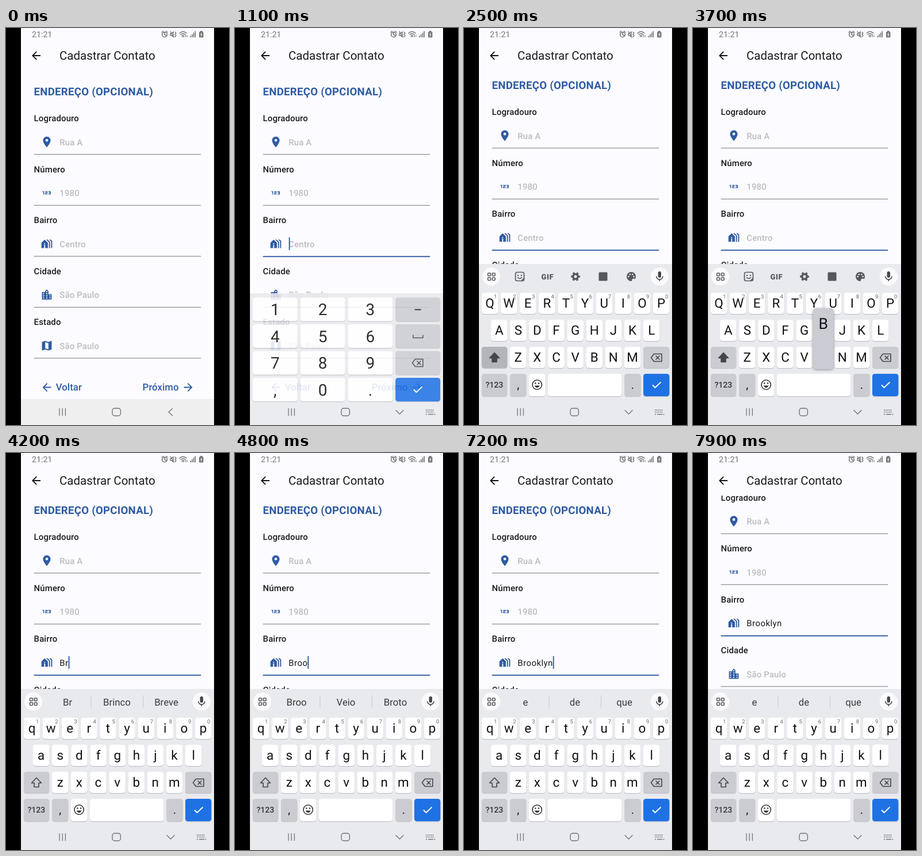
These frames come from a looping animation (388 px wide and 690 px high, 8000 ms). An HTML page:

```html
<!DOCTYPE html>
<html lang="pt">
<head>
<meta charset="utf-8">
<title>Cadastrar Contato</title>
<style>
html, body { margin: 0; width: 100%; height: 100%; overflow: hidden; background: #000; }
svg { display: block; width: 100%; height: 100%; font-family: Roboto, sans-serif; text-rendering: geometricPrecision; }
.line { fill: none; stroke-linecap: round; stroke-linejoin: round; }
.mid { text-anchor: middle; }
.label { font-size: 14.93px; font-weight: 500; letter-spacing: .14px; fill: #1b1b1f; }
.hint { font-size: 14.93px; font-weight: 500; letter-spacing: .14px; fill: #bcbbc0; }
.typed { font-size: 14.93px; letter-spacing: .467px; fill: #1b1b1f; }
.action { font-size: 16.8px; font-weight: 500; letter-spacing: .05px; fill: #2f5ba3; }
.popup { filter: drop-shadow(0 1.5px 2px #0006); }
</style>
</head>
<body>
<svg id="stage" viewBox="0 0 388 690" preserveAspectRatio="none"></svg>
<script>
const BLUE = '#2f5ba3', INK = '#1b1b1f', GREY = '#747478', PANEL = '#e9eaee', FUNC = '#cbccd2', ACCENT = '#1f72e4', TOOL = '#55585d';

const rect = (x, y, w, h, fill, rx = 0, extra = '') =>
  `<rect x="${x}" y="${y}" width="${w}" height="${h}" rx="${rx}" fill="${fill}" ${extra}/>`;
const disc = (x, y, r, fill) => `<circle cx="${x}" cy="${y}" r="${r}" fill="${fill}"/>`;
const text = (s, x, y, cls, extra = '') => `<text x="${x}" y="${y}" class="${cls}" ${extra}>${s}</text>`;
const glyph = (s, x, y, size, fill = '#111', extra = '') => text(s, x, y, 'mid', `font-size="${size}" fill="${fill}" ${extra}`);
const line = (d, color, width = 1.4, extra = '') =>
  `<path class="line" d="${d}" stroke="${color}" stroke-width="${width}" ${extra}/>`;
const icon = (d, x, y, fill, size = 22.4) =>
  `<path d="${d}" fill="${fill}" fill-rule="evenodd" transform="translate(${x - size / 2} ${y - size / 2}) scale(${size / 24})"/>`;
const group = (id, body, extra = '') => `<g id="${id}" ${extra}>${body}</g>`;
const key = (x, y, w, h, fill = '#fff') => rect(x, y + 1.2, w, h, '#c0c2c8', 4.5) + rect(x, y, w, h, fill, 4.5);

const ICONS = {
  back: 'M20 11H7.83l5.59-5.59L12 4l-8 8 8 8 1.41-1.41L7.83 13H20z',
  next: 'M12 4l-1.41 1.41L16.17 11H4v2h12.17l-5.58 5.59L12 20l8-8z',
  pin: 'M12 2C8.13 2 5 5.13 5 9c0 5.25 7 13 7 13s7-7.75 7-13c0-3.87-3.13-7-7-7zm0 9.5a2.5 2.5 0 010-5 2.5 2.5 0 010 5z',
  digits: 'M7 15H5.5v-4.5H4V9h3zm6.5-1.5h-3v-1h2c.55 0 1-.45 1-1V10c0-.55-.45-1-1-1H9v1.5h3v1h-2c-.55 0-1 .45-1 1V15h4.5zm6 .5v-4c0-.55-.45-1-1-1H15v1.5h3v1h-2v1h2v1h-3V15h3.5c.55 0 1-.45 1-1z',
  houses: 'M8 4l-6 6v10h5v-6h2v6h5V10zM9 13H7v-2h2zM18 20V8.35L13.65 4h-2.83L16 9.18V20zM22 20V6.69L19.31 4h-2.83L20 7.52V20z',
  city: 'M15 11V5l-3-3-3 3v2H3v14h18V11zM7 19H5v-2h2zm0-4H5v-2h2zm0-4H5V9h2zm6 8h-2v-2h2zm0-4h-2v-2h2zm0-4h-2V9h2zm0-4h-2V5h2zm6 12h-2v-2h2zm0-4h-2v-2h2z',
  map: 'M20.5 3l-.16.03L15 5.1 9 3 3.36 4.9c-.21.07-.36.25-.36.48V20.5c0 .28.22.5.5.5l.16-.03L9 18.9l6 2.1 5.64-1.9c.21-.07.36-.25.36-.48V3.5c0-.28-.22-.5-.5-.5zM15 19l-6-2.11V5l6 2.11z'
};

const FIELDS = [
  ['Logradouro', 'Rua A', 'pin'], ['Número', '1980', 'digits'], ['Bairro', 'Centro', 'houses'],
  ['Cidade', 'São Paulo', 'city'], ['Estado', 'São Paulo', 'map']
];
const PITCH = 88.55, TEXT_X = 93.3;

function form() {
  const rows = FIELDS.map(([label, hint, name], i) => {
    const y = i * PITCH;
    return text(label, 48.6, 162 + y, 'label') + icon(ICONS[name], 71, 198 + y, BLUE) +
      text(hint, TEXT_X, 203.8 + y, 'hint', `id="hint${i}"`) + rect(48.6, 219.2 + y, 290.6, 1, '#77767c', 0, `id="rule${i}"`);
  }).join('');
  return text('ENDEREÇO (OPCIONAL)', 48.6, 116.7, '', `font-size="18.67" font-weight="700" letter-spacing=".233" fill="${BLUE}"`) +
    rows + text('', TEXT_X, 380.9, 'typed', 'id="typed"') + rect(TEXT_X, 364, 1.87, 22, BLUE, 0, 'id="cursor"');
}

function statusBar() {
  return text('21:21', 45, 16, '', `font-size="14.2" fill="${GREY}"`) +
    line('M276 7.5V11.5L278.5 13M271 7.5L273.5 5.5M281 7.5L278.5 5.5', GREY, 1.5) +
    `<circle cx="276" cy="11.5" r="4.3" fill="none" stroke="${GREY}" stroke-width="1.6"/>` +
    line('M286 9.5H288L291 6.5V15.5L288 13H286ZM286 6L292 16M294 7L296 9L294 11L296 13L294 15.5', GREY, 1.4) +
    line('M302 9Q308 3.5 314 9M304 11.5Q308 8 312 11.5M306 14Q308 12 310 14', GREY, 1.5) +
    disc(308, 15.2, 1, GREY) + line('M312.5 15.5V12.5M315 15.5V12.5', GREY, 1) +
    [0, 1, 2, 3].map(i => rect(320.3 + i * 2.7, 13.5 - i * 2.7, 1.6, 2.7 + i * 2.7, GREY)).join('') +
    rect(336, 6.5, 7.4, 10, GREY, 1.2) + rect(338, 5, 3.4, 2, GREY) + line('M340.5 8.5L338.6 11.6H341L339.2 14.5', '#fff', 1);
}

const navBar = () => rect(26, 645, 336, 45, '#efeff0', 0, 'id="navBg"') +
  line('M93 661.5V673.5M98.2 661.5V673.5M103.4 661.5V673.5', GREY, 1.3) +
  rect(185, 661, 14.4, 13, 'none', 4, `stroke="${GREY}" stroke-width="1.4"`) +
  group('navBack', line('M289.5 661.5L283 667.5L289.5 673.8', GREY)) +
  group('navHide', line('M280 664.5L286.5 671L293 664.5', GREY) +
    line('M333 664H347.5M333 667.5H347.5', GREY, 1.8, 'stroke-dasharray="0 2.9"') + line('M336.5 671.5H344.5', GREY, 1.6) +
    line('M332.8 671.5H333M347.4 671.5H347.6', GREY, 1.8));

const backspace = (x, y) => line(`M${x - 4.5} ${y - 6.5}H${x + 9}V${y + 6.5}H${x - 4.5}L${x - 9.5} ${y}Z` +
  `M${x - 1} ${y - 3}L${x + 5} ${y + 3}M${x + 5} ${y - 3}L${x - 1} ${y + 3}`, '#44464b', 1.6);
const check = (x, y) => line(`M${x - 7} ${y}L${x - 2.5} ${y + 4.5}L${x + 7.5} ${y - 5}`, '#fff', 1.9, 'style="stroke-linecap:butt"');

function numberPad() {
  const cells = ['123', '456', '789', ',0.'].map((row, r) => {
    const y = 468.5 + r * 46.5;
    return [...row].map((c, i) => key(30.8 + i * 82.8, y, 78, 41) + glyph(c, 69.8 + i * 82.8, y + 30.5, 28)).join('') +
      key(279.2, y, 78, 41, r === 3 ? ACCENT : FUNC);
  }).join('');
  return rect(26, 461, 336, 229, PANEL) + cells + line('M313.5 489.5H323', '#222', 1.9) +
    line('M310 534V538.5H327V534', '#44464b', 1.6) + backspace(318, 582) + check(318, 628.5);
}

const STEP = 33.12, ROW_TOPS = [460, 507, 554], ROW_X = [45, 61.2, 94.2], LETTERS = ['qwertyuiop', 'asdfghjkl', 'zxcvbnm'];
const eachLetter = draw => LETTERS.map((row, r) => [...row].map((c, i) => draw(c, ROW_X[r] + i * STEP, ROW_TOPS[r], r, i)).join('')).join('');
const letters = upper => eachLetter((c, x, y) => glyph(upper ? c.toUpperCase() : c, x, y + 26.3, 22.4));

function toolbar() {
  const dot = (x, y) => disc(x, y, 1.3, PANEL);
  return rect(89.5, 424.5, 15, 15, 'none', 3, `stroke="${TOOL}" stroke-width="1.7"`) +
    line('M93.5 433.5Q97 437.5 100.5 433.5M104 435L100 439.5', TOOL, 1.5) + disc(94, 430, 1.2, TOOL) + disc(100, 430, 1.2, TOOL) +
    glyph('GIF', 145.3, 436.7, 13, TOOL, 'font-weight="800" letter-spacing=".6"') +
    `<circle cx="194" cy="432" r="4.3" fill="none" stroke="${TOOL}" stroke-width="3.6"/>` +
    `<circle cx="194" cy="432" r="6.7" fill="none" stroke="${TOOL}" stroke-width="2.4" stroke-dasharray="3.5 3.517" stroke-dashoffset="1.7"/>` +
    rect(234.5, 424.5, 15, 15, TOOL, 1.5) +
    disc(291, 432, 8, TOOL) + dot(286.5, 432) + dot(288.7, 428.3) + dot(293.3, 428.3) + dot(295.5, 432) + disc(295.5, 439, 3.6, PANEL);
}

function qwerty() {
  const keys = eachLetter((c, x, y, r, i) => key(x - 14.2, y, 28.4, 37) + (r ? '' : glyph((i + 1) % 10, x + 9.7, 470, 9.5, '#66686d')));
  const functions = [[30.8, 554, 44.5], [312, 554, 45.4], [30.8, 601, 44.5], [80, 601, 28.4], [279.2, 601, 28.4]]
    .map(([x, y, w]) => key(x, y, w, y > 600 ? 39 : 37, FUNC)).join('');
  const grid = [41.5, 49.2].map(x => [426, 433.7].map(y => rect(x, y, 4.8, 4.8, 'none', 1, `stroke="${TOOL}" stroke-width="1.6"`)).join('')).join('');
  return rect(26, 410, 336, 280, PANEL) + disc(47.5, 432, 15.7, '#fafafc') + grid +
    disc(340.3, 432, 15.7, '#fafafc') + rect(337.6, 423, 5.4, 11, '#44464b', 2.7) +
    line('M334.7 431.5A5.6 5.6 0 00345.9 431.5M340.3 437.3V440', '#44464b', 1.6, 'style="stroke-linecap:butt"') +
    group('tools', toolbar()) +
    group('suggest', rect(241, 416, 79, 32, '#d3d5da', 5, 'id="pick"') + rect(147.5, 421, 1, 22, '#c6c8cd') + rect(238, 421, 1, 22, '#c6c8cd') +
      [107, 193, 279].map((x, i) => glyph('', x, 438.5, 16.8, '#3a3c40', `id="word${i}"`)).join('')) +
    keys + functions + rect(30.8, 554, 44.5, 37, '#b3b5bb', 4.5, 'id="shiftDown"') +
    line('M53 564.5L61.5 573.5H57V580.5H49V573.5H44.5Z', '#44464b', 1.6, 'id="shift"') + backspace(335, 573) +
    glyph('?123', 52.8, 625.3, 14, '#333', 'font-weight="500"') + glyph(',', 94.2, 627, 20) + glyph('.', 293.4, 627, 20) +
    key(113, 601, 28.4, 39) + key(146, 601, 128.2, 39) + key(312, 601, 45.4, 39, ACCENT) + check(335, 620.5) +
    `<circle cx="127.2" cy="620" r="8.2" fill="none" stroke="#333" stroke-width="1.6"/>` +
    disc(124.3, 617.5, 1.3, '#333') + disc(130.1, 617.5, 1.3, '#333') + `<path d="M122.6 621.5H131.8Q127.2 629 122.6 621.5" fill="#333"/>` +
    group('lower', letters(false)) + group('upper', letters(true)) +
    group('popup', rect(-17.8, -67, 35.6, 106, '#cbccd3', 5, 'class="popup"') + glyph('', 0, -31.5, 26.5, '#111', 'id="popupText"'));
}

const stage = document.getElementById('stage');
stage.innerHTML = `<clipPath id="body">${rect(26, 74, 336, 571)}</clipPath>` +
  rect(0, 0, 388, 690, '#000') + rect(26, 0, 336, 690, '#fcfbff') + statusBar() +
  icon(ICONS.back, 52.5, 48, '#111') + text('Cadastrar Contato', 93, 55, '', `font-size="20.53" fill="${INK}"`) +
  `<g clip-path="url(#body)">${group('form', form())}</g>` +
  icon(ICONS.back, 71, 624.5, BLUE) + text('Voltar', 86.7, 630.2, 'action') +
  text('Próximo', 237.6, 630.2, 'action') + icon(ICONS.next, 317, 624.5, BLUE) +
  group('numbers', numberPad()) + group('qwerty', qwerty()) + navBar();

const el = id => document.getElementById(id);
const show = (id, on) => el(id).setAttribute('visibility', on ? 'inherit' : 'hidden');

// Each step overrides part of the state from its time on.
const STEPS = [
  [0, { focus: false, cursor: false, typed: '', numbers: 0, qwerty: false, scroll: 0, upper: false, press: false, popup: '', words: '', pick: false }],
  [900, { focus: true, cursor: true }],
  [1000, { numbers: .45 }],
  [1100, { numbers: .87 }],
  [1200, { numbers: 0, qwerty: true }],
  [1300, { scroll: 11, cursor: false }],
  [1800, { cursor: true }],
  [2300, { cursor: false }],
  [2500, { upper: true, press: true }],
  [2600, { press: false }],
  [2800, { cursor: true }],
  [3300, { cursor: false }],
  [3700, { popup: 'B' }],
  [3800, { popup: '', upper: false, typed: 'B', cursor: true }],
  [3900, { words: 'B Bom Boa' }],
  [4100, { popup: 'r' }],
  [4200, { popup: '', typed: 'Br', words: 'Br Brinco Breve' }],
  [4400, { popup: 'o' }],
  [4500, { popup: '', typed: 'Bro', words: 'Bro Broto Bronca' }],
  [4600, { popup: 'o' }],
  [4700, { typed: 'Broo' }],
  [4800, { popup: '', words: 'Broo Veio Broto' }],
  [5200, { cursor: false }],
  [5700, { cursor: true }],
  [6000, { popup: 'k' }],
  [6100, { popup: '', typed: 'Brook' }],
  [6200, { words: 'Brook Brooklin Brooklyn' }],
  [6400, { popup: 'l' }],
  [6500, { popup: '', typed: 'Brookl' }],
  [6600, { words: 'Brookl Brooklin Brooklyn' }],
  [7000, { cursor: false, pick: true }],
  [7200, { cursor: true, pick: false, typed: 'Brooklyn', words: 'e de que' }],
  [7700, { cursor: false, scroll: 32 }],
  [7800, { scroll: 60 }],
  [7900, { scroll: 79.5 }]
];

function placePopup(letter) {
  show('popup', letter);
  if (!letter) return;
  const row = LETTERS.findIndex(r => r.includes(letter.toLowerCase()));
  const x = ROW_X[row] + LETTERS[row].indexOf(letter.toLowerCase()) * STEP;
  el('popup').setAttribute('transform', `translate(${x} ${ROW_TOPS[row]})`);
  el('popupText').textContent = letter;
}

function render(s) {
  el('form').setAttribute('transform', `translate(0 ${-s.scroll})`);
  el('typed').textContent = s.typed;
  show('hint2', !s.typed);
  show('cursor', s.cursor);
  el('cursor').setAttribute('x', TEXT_X + (s.typed ? el('typed').getComputedTextLength() : .4));
  el('rule2').setAttribute('height', s.focus ? 1.87 : 1);
  el('rule2').setAttribute('fill', s.focus ? BLUE : '#77767c');

  const keyboard = s.qwerty || s.numbers > 0;
  el('numbers').setAttribute('opacity', s.numbers);
  show('qwerty', s.qwerty);
  show('navBack', !keyboard);
  show('navHide', keyboard);
  el('navBg').setAttribute('fill', s.qwerty ? PANEL : keyboard ? 'none' : '#efeff0');

  show('upper', s.qwerty && s.upper);
  show('lower', s.qwerty && !s.upper);
  show('shiftDown', s.qwerty && s.press);
  el('shift').style.fill = s.upper ? '#44464b' : 'none';
  show('tools', s.qwerty && !s.words);
  show('suggest', s.qwerty && s.words);
  show('pick', s.qwerty && s.pick);
  s.words.split(' ').forEach((word, i) => el('word' + i).textContent = word);
  placePopup(s.popup);
}

const LOOP = 8000;
let start, shown = -1;
function tick(now) {
  start ??= now;
  const time = (now - start) % LOOP;
  const index = STEPS.findLastIndex(([at]) => at <= time);
  if (index !== shown) {
    shown = index;
    render(Object.assign({}, ...STEPS.slice(0, index + 1).map(([, change]) => change)));
  }
  requestAnimationFrame(tick);
}
tick(performance.now());
</script>
</body>
</html>
```
